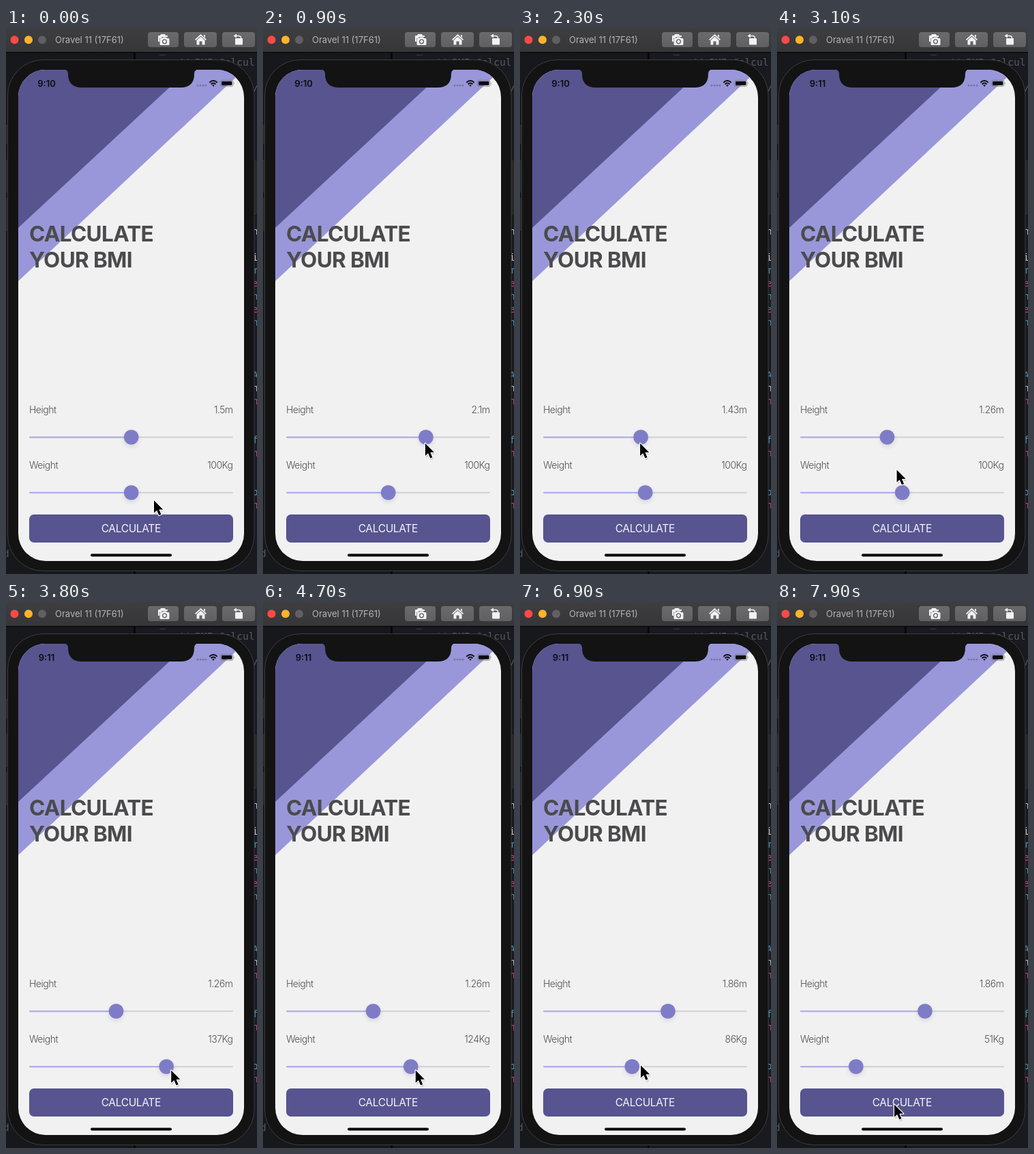
An HTML page for the animation above (8000 ms loop, 368 px wide and 798 px high).

```html
<!DOCTYPE html>
<html lang="en">
<head>
<meta charset="utf-8">
<title>BMI calculator</title>
<style>
  html, body { margin: 0; width: 100%; height: 100%; overflow: hidden; background: #17181c; }
  svg { display: block; width: 368px; height: 798px; font-family: Inter, Roboto, sans-serif; }
  .label { font-size: 14px; font-weight: 300; letter-spacing: -.5px; fill: #515153; }
  .end { text-anchor: end; }
  .mid { text-anchor: middle; }
  .head { font-size: 31.5px; font-weight: 700; letter-spacing: -.65px; fill: #4b4b4d; }
  .code { font-family: "DejaVu Sans Mono", monospace; font-size: 14.5px; }
</style>
</head>
<body>
<svg viewBox="0 0 368 798">
  <defs>
    <linearGradient id="bar" x2="0" y2="1">
      <stop stop-color="#3e3e40"/><stop offset="1" stop-color="#363638"/>
    </linearGradient>
    <linearGradient id="key" x2="0" y2="1">
      <stop stop-color="#6b6b6d"/><stop offset="1" stop-color="#606062"/>
    </linearGradient>
    <clipPath id="screen"><rect x="18" y="61" width="331" height="718" rx="40"/></clipPath>
    <filter id="soft" x="-50%" y="-50%" width="200%" height="200%"><feGaussianBlur stdDeviation="3"/></filter>
    <filter id="blur" x="-50%" y="-50%" width="200%" height="200%"><feGaussianBlur stdDeviation="1.3"/></filter>
    <path id="arrow" d="M0 0V20.5L4.7 16.2L8.3 24.3L11.8 22.8L8.3 14.8H14.8Z"/>
  </defs>

  <!-- editor behind the phone -->
  <rect width="368" height="798" fill="#17181c"/>
  <rect x="189" y="36" width="179" height="762" fill="#191a1f"/>
  <rect x="187" y="36" width="3" height="762" fill="#08080a"/>
  <g class="code" id="code"></g>

  <!-- phone -->
  <g fill="#252527" stroke="#3b3b3d" stroke-width=".7">
    <rect y="142" width="4" height="27" rx="1"/>
    <rect y="193" width="4" height="47" rx="1"/>
    <rect y="249" width="4" height="47" rx="1"/>
    <rect x="362" y="194" width="5" height="78" rx="1"/>
  </g>
  <rect x="2.5" y="46.5" width="361.5" height="747" rx="52" fill="#131314" stroke="#3d3d3f"/>
  <g clip-path="url(#screen)">
    <rect x="18" y="61" width="331" height="718" fill="#f1f1f1"/>
    <path d="M18 61H349L18 370Z" fill="#9997d9"/>
    <path d="M18 61H267.5L18 292Z" fill="#575490"/>
  </g>
  <path d="M85 60.5Q91 61 91 67Q91 87 111 87H256Q276 87 276 67Q276 61 282 60.5Z" fill="#131314"/>

  <!-- status bar -->
  <text id="clock" class="mid" x="59.5" y="85.8" font-size="13" font-weight="600" fill="#0c0c10"></text>
  <path d="M281 84H294" stroke="#7775a4" stroke-width="3" stroke-linecap="round" stroke-dasharray="0 4"/>
  <g fill="none" stroke="#0c0c10" stroke-width="1.9">
    <path d="M298.3 79.7Q304 74.3 309.7 79.7"/>
    <path d="M300.6 82.2Q304 79 307.4 82.2"/>
  </g>
  <path d="M302.2 83.8Q304 82.4 305.8 83.8L304 85.8Z" fill="#0c0c10"/>
  <rect x="314.5" y="76.5" width="18.5" height="8.8" rx="2.4" fill="none" stroke="#77777b" stroke-width=".8"/>
  <rect x="316" y="78" width="15.5" height="5.8" rx="1.2" fill="#0c0c10"/>
  <path d="M334.3 79.3Q335.6 80.9 334.3 82.5Z" fill="#77777b"/>

  <!-- form -->
  <text class="head" x="34" y="312">CALCULATE</text>
  <text class="head" x="34" y="350">YOUR BMI</text>
  <rect x="34" y="711" width="299" height="41" rx="7" fill="#575490"/>
  <text class="mid" x="183.3" y="737" font-size="15.5" letter-spacing="-.35" fill="#f4f4fa">CALCULATE</text>
  <g id="sliders"></g>
  <rect x="124" y="768.5" width="119" height="4" rx="2" fill="#050505"/>

  <!-- window bar -->
  <rect width="368" height="35.5" fill="url(#bar)"/>
  <rect y="35" width="368" height="1.2" fill="#060607"/>
  <circle cx="12.5" cy="17.3" r="6" fill="#fc4a48"/>
  <circle cx="33" cy="17.3" r="6" fill="#fdb42a"/>
  <circle cx="53" cy="17.3" r="6" fill="#606063"/>
  <text x="72" y="22" font-size="13" fill="#b4b4b6">Oravel 11 (17F61)</text>
  <g fill="url(#key)">
    <rect x="208" y="6" width="45" height="22" rx="4"/>
    <rect x="261" y="6" width="48" height="22" rx="4"/>
    <rect x="317" y="6" width="48" height="22" rx="4"/>
  </g>
  <g fill="#f2f2f3">
    <path d="M223 20V12Q223 11 224 11H226L227 9H233L234 11H237V13H229L227.5 15H225V20Z"/>
    <path d="M227 15H229L230 13.5H235L236 15H238Q239.5 15 239.5 16.5V23.5Q239.5 25 238 25H227Q225.5 25 225.5 23.5V16.5Q225.5 15 227 15Z"/>
    <circle cx="232.5" cy="19.8" r="2.9" fill="none" stroke="#646466" stroke-width="1.4"/>
    <path d="M285.5 9L294 16.8L292.8 18L285.5 11.4L278.2 18L277 16.8ZM290 10H292V14L290 12.2Z"/>
    <path d="M285.5 12.7L291.5 18V24.5H287.5V19.5H283.5V24.5H279.5V18Z"/>
    <rect x="336" y="15" width="11" height="9.5" rx="1"/>
    <path d="M338 8.5V14.5L333.5 11.5Z"/>
    <path d="M337 11.5H341Q344.5 11.5 344.5 15" fill="none" stroke="#f2f2f3" stroke-width="1.5"/>
  </g>

  <g id="cursor">
    <g transform="translate(1 2.6) scale(.89)">
      <use href="#arrow" x="1" y="2" opacity=".4" filter="url(#blur)"/>
      <use href="#arrow" stroke="#fff" stroke-width="2.8" stroke-linejoin="round" style="paint-order:stroke"/>
    </g>
  </g>
</svg>
<script>
const LOOP = 8000, STEP = 100;
const el = id => document.getElementById(id);

function makeSlider(name, y, max, print) {
  el("sliders").insertAdjacentHTML("beforeend", `<g>
    <rect x="34" y="${y - 1}" width="299" height="2.2" rx="1.1" fill="#d4d4d6"/>
    <rect x="34" y="${y - 1}" height="2.2" rx="1.1" fill="#b2b0e4"/>
    <g><circle cy="${y + 3}" r="11" fill="#55527f" opacity=".16" filter="url(#soft)"/>
    <circle cy="${y}" r="10.8" fill="#7f7cc7"/></g>
    <text class="label" x="34" y="${y - 35}">${name}</text>
    <text class="label end" x="332.5" y="${y - 35}"></text></g>`);
  const [, fill, thumb, , text] = el("sliders").lastElementChild.children;
  const place = value => 45.2 + 277 * value / max;
  const show = value => {
    fill.setAttribute("width", place(value) - 34);
    thumb.setAttribute("transform", `translate(${place(value)} 0)`);
    text.textContent = print(value);
  };
  return { y, place, show };
}

const height = makeSlider("Height", 598, 3, v => +v.toFixed(2) + "m");
const weight = makeSlider("Weight", 679, 200, v => Math.round(v) + "Kg");

// Each drag holds a thumb at an offset and swings it between stops [time, value]
const drags = [
  { slider: height, grip: [-2, 6.5], stops: [[500, 1.5], [1200, 2.485], [2700, 1.204], [2900, 1.26]] },
  { slider: weight, grip: [6, 3], stops: [[3300, 100], [4140, 158], [5300, 86]] },
  { slider: height, grip: [9, 4], stops: [[5600, 1.26], [6400, 1.93], [6700, 1.86]] },
  { slider: weight, grip: [6, 4], stops: [[6950, 86], [7500, 51]] },
];

// Eased value at time t, constant before the first stop and after the last
function ease(stops, t) {
  const i = stops.findIndex(s => s[0] > t);
  if (i < 0) return stops.at(-1)[1];
  if (i === 0) return stops[0][1];
  const [[t0, a], [t1, b]] = stops.slice(i - 1, i + 1), u = (t - t0) / (t1 - t0);
  return a + (b - a) * u * u * (3 - 2 * u);
}

const valueOf = (slider, t) =>
  ease(drags.filter(d => d.slider === slider).flatMap(d => d.stops), t);

function hold({ slider, grip, stops }, t) {
  return [slider.place(ease(stops, t)) + grip[0], slider.y + grip[1]];
}

// Where the pointer is: on a held thumb, or on its way to the next one
function pointer(t) {
  const held = drags.filter(d => d.stops[0][0] <= t).at(-1);
  const next = drags.find(d => d.stops[0][0] > t);
  const from = held ? hold(held, t) : [216, 688];
  const to = next ? hold(next, t) : [171, 732];
  const leave = held ? held.stops.at(-1)[0] + (next ? 0 : 100) : 0;
  const arrive = next ? next.stops[0][0] : 7900;
  return from.map((p, k) => ease([[leave, p], [arrive, to[k]]], t));
}

// Edge of the code that shows beside the phone, one letter and one colour per line
const ink = { g: "#555962", w: "#c9c9cd", c: "#4a9cc0", p: "#d8457e" };
const word = (x, y, s, c) => `<text x="${x}" y="${y}" fill="${ink[c]}">${s}</text>`;
const letters = "n imenen   Ann  fn  on", colours = "w wcpcpc   cwp  cp  cp";
el("code").innerHTML = word(225, 36, "_", "g") + word(251, 55, "// BMI Calcul", "g")
  + word(361, 94, "/", "g") + word(-4, 773, "d", "g")
  + [...letters].map((s, i) => s === " " ? "" : word(361, 302 + 19.05 * i, s, colours[i])).join("");

function draw(time) {
  const t = Math.floor(time % LOOP / STEP) * STEP;
  for (const s of [height, weight]) s.show(valueOf(s, t));
  el("clock").textContent = t < 3000 ? "9:10" : "9:11";
  el("cursor").setAttribute("transform", `translate(${pointer(t)})`);
}

let start;
function tick(now) {
  start ??= now;
  draw(now - start);
  requestAnimationFrame(tick);
}
draw(0);
requestAnimationFrame(tick);
</script>
</body>
</html>
```
